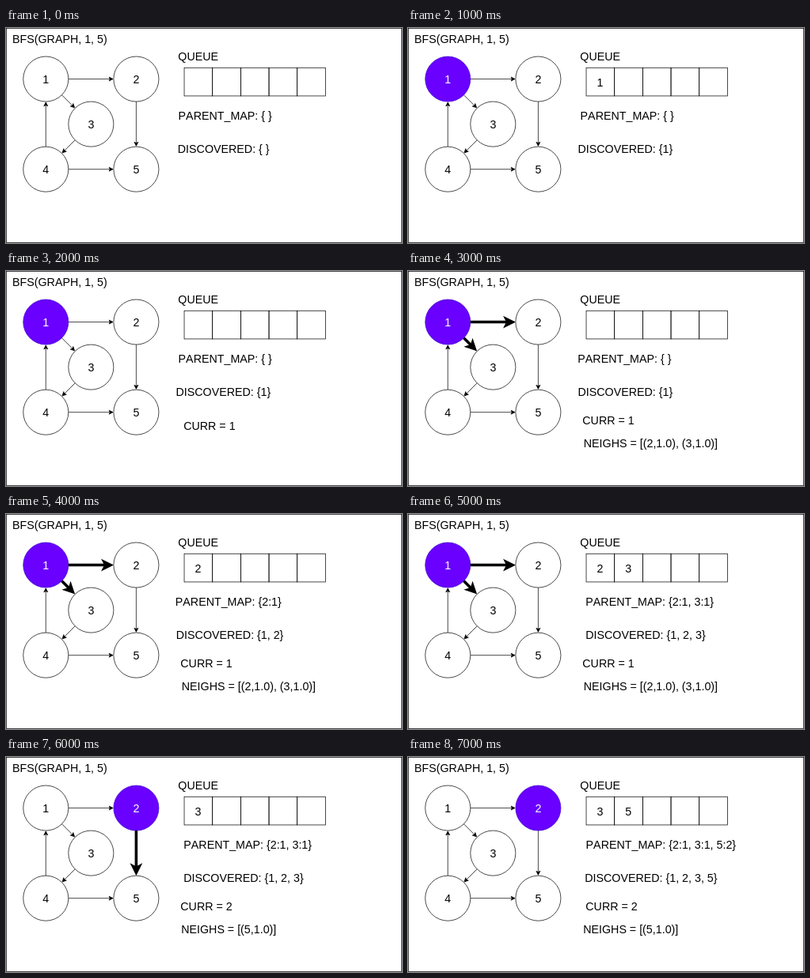
An HTML page with a canvas that plays this animation: 500 px wide and 272 px high, repeating every 8000 ms.

```html
<!DOCTYPE html>
<html lang="en">
<head>
<meta charset="utf-8">
<title>Breadth-first search</title>
<style>
  html, body { margin: 0; width: 100%; height: 100%; overflow: hidden; background: #fff; }
  canvas { display: block; width: 500px; height: 272px; }
</style>
</head>
<body>
<canvas id="stage" width="500" height="272"></canvas>
<script>
const ctx = document.getElementById('stage').getContext('2d');
const STEP_MS = 1000;
const SCALE = 500 / 701; // diagram units to pixels
const RADIUS = 40;
const CELL = 50;
const FONT = '14.27px "Liberation Sans", Arial, sans-serif';

const nodes = { 1: [70, 90], 2: [230, 90], 3: [150, 170], 4: [70, 250], 5: [230, 250] };
const edges = ['12', '13', '25', '34', '41', '45'];

// Each label is [text, x] or [text, x, baseline].
const steps = [
  { queue: [], bold: [], parents: ['{ }', 217.6], found: ['{ }', 216.8] },
  { active: 1, queue: [1], bold: [], parents: ['{ }', 217.6], found: ['{1}', 214.5] },
  { active: 1, queue: [], bold: [], parents: ['{ }', 217.6], found: ['{1}', 214.5],
    curr: ['1', 224.2, 201] },
  { active: 1, queue: [], bold: ['12', '13'], parents: ['{ }', 214.3], found: ['{1}', 214.5],
    curr: ['1', 220.3], neighs: ['(2,1.0), (3,1.0)', 221.8] },
  { active: 1, queue: [2], bold: ['12', '13'], parents: ['{2:1}', 213.8], found: ['{1, 2}', 214.8],
    curr: ['1', 220.3], neighs: ['(2,1.0), (3,1.0)', 221.8] },
  { active: 1, queue: [2, 3], bold: ['12', '13'], parents: ['{2:1, 3:1}', 224.3], found: ['{1, 2, 3}', 224.2],
    curr: ['1', 220.3], neighs: ['(2,1.0), (3,1.0)', 221.8] },
  { active: 2, queue: [3], bold: ['25'], parents: ['{2:1, 3:1}', 224.3], found: ['{1, 2, 3}', 224.2],
    curr: ['2', 220.3], neighs: ['(5,1.0)', 221.2] },
  { active: 2, queue: [3, 5], bold: [], parents: ['{2:1, 3:1, 5:2}', 224.6], found: ['{1, 2, 3, 5}', 223.2],
    curr: ['2', 224.3], neighs: ['(5,1.0)', 221.2] }
];

const toPx = v => (v + 0.5) * SCALE;

function text(str, x, y, color = '#000', align = 'left') {
  ctx.fillStyle = color;
  ctx.textAlign = align;
  ctx.fillText(str, x, y);
}

function arrow(from, to, width) {
  const [x1, y1] = nodes[from], [x2, y2] = nodes[to];
  const span = Math.hypot(x2 - x1, y2 - y1);
  const tip = span - RADIUS - width * 1.118; // the mitred tip touches the circle
  const head = 6 + width;
  const notch = tip - head * 0.75;
  ctx.save();
  ctx.translate(x1, y1);
  ctx.rotate(Math.atan2(y2 - y1, x2 - x1));
  ctx.lineWidth = width;
  ctx.strokeStyle = ctx.fillStyle = '#000';
  ctx.beginPath();
  ctx.moveTo(RADIUS, 0);
  ctx.lineTo(notch, 0);
  ctx.stroke();
  ctx.beginPath();
  ctx.moveTo(tip, 0);
  ctx.lineTo(tip - head, head / 2);
  ctx.lineTo(notch, 0);
  ctx.lineTo(tip - head, -head / 2);
  ctx.closePath();
  ctx.fill();
  ctx.stroke();
  ctx.restore();
}

function drawShapes({ active, bold }) {
  ctx.save();
  ctx.scale(SCALE, SCALE);
  ctx.translate(0.5, 0.5);
  ctx.lineWidth = 1;
  ctx.strokeStyle = '#000';
  ctx.strokeRect(0, 0, 700, 380);
  for (let i = 0; i < 5; i++) ctx.strokeRect(315 + i * CELL, 70, CELL, CELL);
  for (const id in nodes) {
    const on = +id === active;
    ctx.fillStyle = on ? '#6a00ff' : '#fff';
    ctx.strokeStyle = on ? '#3700cc' : '#000';
    ctx.beginPath();
    ctx.arc(...nodes[id], RADIUS, 0, Math.PI * 2);
    ctx.fill();
    ctx.stroke();
  }
  for (const e of edges) arrow(e[0], e[1], bold.includes(e) ? 5 : 1);
  ctx.restore();
}

function drawLabels({ active, queue, parents, found, curr, neighs }) {
  ctx.font = FONT;
  ctx.fontKerning = 'none';
  text('BFS(GRAPH, 1, 5)', 8, 19);
  text('QUEUE', 217.3, 41);
  for (const id in nodes) {
    const [x, y] = nodes[id];
    text(id, toPx(x), toPx(y) + 5.3, +id === active ? '#fff' : '#000', 'center');
  }
  queue.forEach((id, i) => text(id, toPx(340 + i * CELL) - 0.4, 73.8, '#000', 'center'));
  text('PARENT_MAP: ' + parents[0], parents[1], 116);
  text('DISCOVERED: ' + found[0], found[1], 158);
  if (curr) text('CURR = ' + curr[0], curr[1], curr[2] || 194);
  if (neighs) text('NEIGHS = [' + neighs[0] + ']', neighs[1], 223);
}

function render(now) {
  const step = steps[Math.floor(now / STEP_MS) % steps.length];
  ctx.fillStyle = '#fff';
  ctx.fillRect(0, 0, 500, 272);
  drawShapes(step);
  drawLabels(step);
}

function tick() {
  render(performance.now());
  requestAnimationFrame(tick);
}
tick();
</script>
</body>
</html>
```
